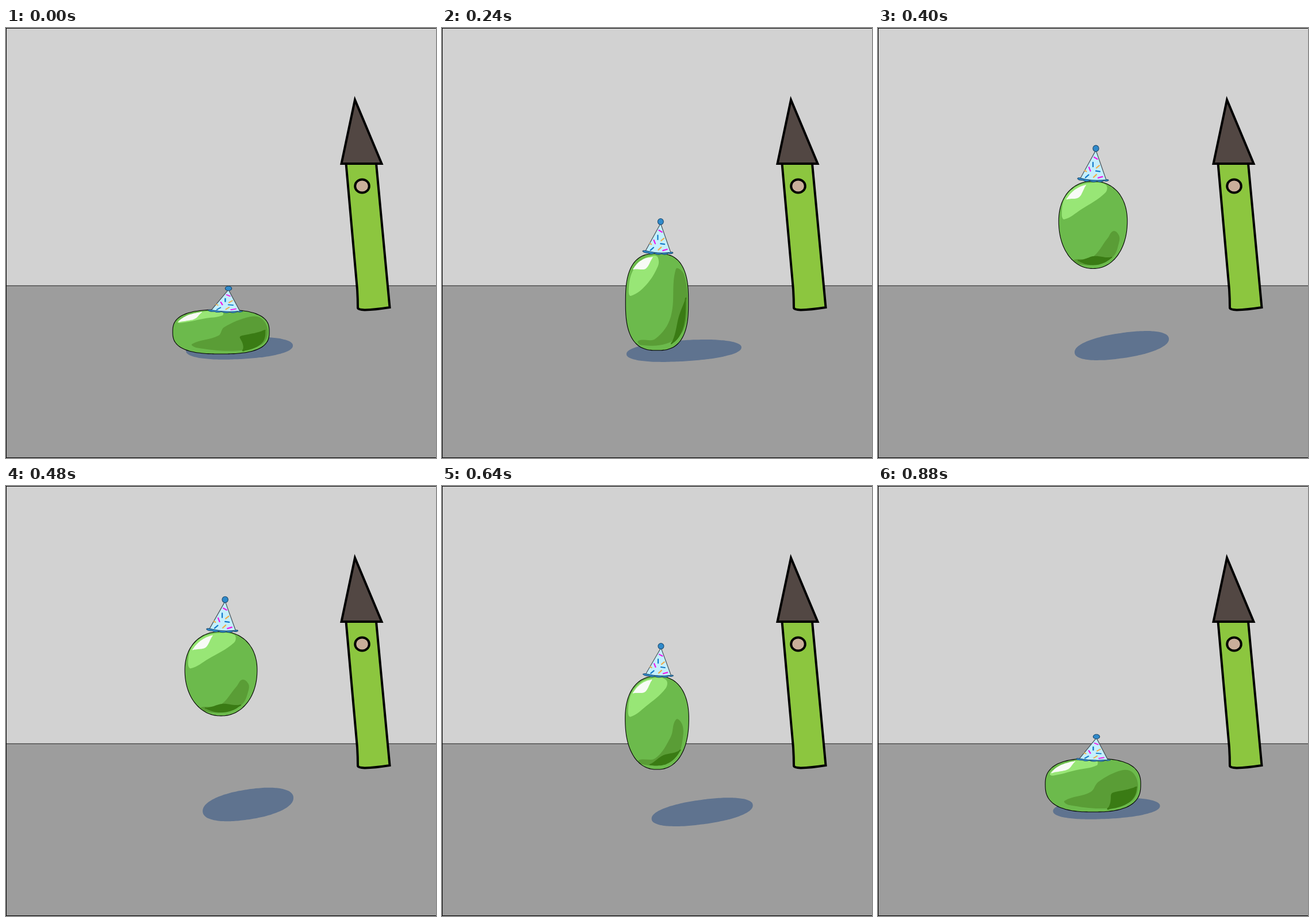
An HTML page with a canvas that plays this animation: 748 px wide and 748 px high, repeating every 960 ms.

```html
<!DOCTYPE html>
<html lang="en">
<head>
<meta charset="utf-8">
<title>Party jelly bounce</title>
<style>
html, body { margin: 0; width: 100%; height: 100%; overflow: hidden; }
canvas { display: block; }
</style>
</head>
<body>
<canvas id="stage" width="748" height="748"></canvas>
<script>
const ctx = document.getElementById('stage').getContext('2d');
const STEP = 80, STEPS = 12;
const FLOOR = 567, CENTER = 374;

// Key poses: body size, lift off the floor, roll of the shading,
// hat (x, rise above the body) and shadow (centre, radii)
const keys = [
  { at: 0, w: 168, h: 77, lift: 0, roll: 0, hatX: 387, rise: 37, sx: 406, sy: 557, rx: 93, ry: 19 },
  { at: 2, w: 130, h: 120, lift: 0, roll: 0.05, hatX: 383.5, rise: 50.5, sx: 410, sy: 564, rx: 87, ry: 22 },
  { at: 4, w: 96, h: 206, lift: 33, roll: 0, hatX: 377.5, rise: 59, sx: 431, sy: 557, rx: 110, ry: 15 },
  { at: 5, w: 119, h: 152, lift: 148.5, roll: 1, hatX: 379, rise: 57, sx: 424, sy: 552.5, rx: 82, ry: 22 },
  { at: 7, w: 125, h: 152, lift: 148, roll: 1, hatX: 382.5, rise: 54, sx: 425, sy: 558, rx: 82, ry: 27.5 },
  { at: 9, w: 103, h: 164, lift: 0, roll: 0.45, hatX: 379, rise: 49, sx: 471, sy: 574, rx: 94, ry: 15 },
  { at: 11, w: 166, h: 93, lift: 0, roll: 0.15, hatX: 380, rise: 38, sx: 397.5, sy: 561, rx: 93, ry: 18 }
];

const clamp = (v, lo, hi) => Math.min(hi, Math.max(lo, v));

// Key by index, wrapping around the loop with its time shifted to match
function keyAt(i) {
  const n = keys.length, turn = Math.floor(i / n), key = keys[i - turn * n];
  return { ...key, at: key.at + turn * STEPS };
}

// Smooth cubic motion through the keys
function poseAt(step) {
  const i = keys.findLastIndex(k => k.at <= step);
  const [p, a, b, q] = [-1, 0, 1, 2].map(d => keyAt(i + d));
  const span = b.at - a.at, t = (step - a.at) / span, s = 1 - t;
  const pose = {};
  for (const name in a) {
    const m0 = (b[name] - p[name]) / (b.at - p.at) * span;
    const m1 = (q[name] - a[name]) / (q.at - a.at) * span;
    pose[name] = a[name] * s * s * (1 + 2 * t) + b[name] * t * t * (3 - 2 * t) + m0 * t * s * s - m1 * t * t * s;
  }
  pose.lift = Math.max(0, pose.lift);
  pose.roll = clamp(pose.roll, 0, 1);
  return pose;
}

// Point on the unit superellipse in the direction of an angle
function rim(angle, n, scale = 1) {
  const c = Math.cos(angle), s = Math.sin(angle);
  const r = scale * (Math.abs(c) ** n + Math.abs(s) ** n) ** (-1 / n);
  return [r * c, r * s];
}

const range = (n, fn) => Array.from({ length: n }, (_, i) => fn(i / n));
const oval = n => range(96, t => rim(t * Math.PI * 2, n));

// Crescent hugging the rim, thickest in the middle
function crescent(middle, half, outer, thick, n) {
  return range(32, t => {
    const inner = t >= 0.5;
    const along = inner ? 2 - 2 * t : 2 * t;
    const depth = inner ? thick * Math.sin(along * Math.PI) : 0;
    return rim(middle + (along * 2 - 1) * half, n, outer - depth);
  });
}

// Closed smooth curve; handles follow each segment to avoid overshoot
function blob(points) {
  const n = points.length, at = i => points[(i + n) % n];
  const tangent = i => {
    const [x0, y0] = at(i - 1), [x1, y1] = at(i + 1);
    const d = Math.hypot(x1 - x0, y1 - y0) || 1;
    return [(x1 - x0) / d, (y1 - y0) / d];
  };
  const path = new Path2D();
  path.moveTo(...at(0));
  for (let i = 0; i < n; i++) {
    const [x0, y0] = at(i), [x1, y1] = at(i + 1);
    const [u0, v0] = tangent(i), [u1, v1] = tangent(i + 1);
    const h = Math.hypot(x1 - x0, y1 - y0) * 0.35;
    path.bezierCurveTo(x0 + u0 * h, y0 + v0 * h, x1 - u1 * h, y1 - v1 * h, x1, y1);
  }
  path.closePath();
  return path;
}

function paint(path, fill, stroke, width) {
  if (fill) { ctx.fillStyle = fill; ctx.fill(path); }
  if (stroke) { ctx.strokeStyle = stroke; ctx.lineWidth = width; ctx.stroke(path); }
}

function rect(color, x, y, w, h) {
  ctx.fillStyle = color;
  ctx.fillRect(x, y, w, h);
}

function drawRoom() {
  rect('#d2d2d2', 0, 0, 748, 448);
  rect('#9d9d9d', 0, 448, 748, 300);
  rect('#222', 0, 447.8, 748, 1);
  rect('#000', 0, 0, 748, 1);
  rect('#000', 0, 747, 748, 1);
  rect('#000', 0, 0, 1, 748);
}

const wall = new Path2D('M591.5 236L611 455Q612 472 612 487Q613 490 624 490.5Q642 490 667.5 486L644 236Z');
const roof = new Path2D('M607 125L583.5 236H653.5Z');
const porthole = new Path2D();
porthole.ellipse(619.5, 275, 12.3, 11.5, 0, 0, Math.PI * 2);

function drawTower() {
  paint(wall, '#8cc63f', '#000', 4);
  paint(roof, '#524743', '#000', 4);
  paint(porthole, '#c9ae9a', '#000', 4);
}

const cone = new Path2D('M0 3L-27 49.5Q-5 55 18 52Z');
const brim = new Path2D('M-32 49.5Q-30 47.5 -26 49Q-4 54.5 17 51.5Q22 50.5 22 52.5Q18 55 14 53Q8 57 2 54Q-5 57 -11 53Q-17 56 -22 52.5Q-30 53 -32 49.5Z');
const ball = new Path2D();
ball.arc(0, 0, 5.1, 0, Math.PI * 2);
const sprinkles = {
  '#f018e8': 'M-3 14.5L2.5 17.5M-12 31L-9.5 37M4 48.5L11.5 46.5',
  '#1479c8': 'M-5 23V30M0 37L7 38M-18 48L-12.5 43.5',
  '#f0ae4c': 'M1 32L6 28M-19 36.5L-16.5 38M-4 47.5L1 43'
};

function drawHat({ hatX, rise, w, h, lift }) {
  ctx.save();
  ctx.translate(hatX, FLOOR - lift - h - rise);
  ctx.scale(0.73 + 0.0023 * w, 0.23 + 0.0145 * rise);
  paint(cone, '#c4effd', '#465058', 1.2);
  ctx.lineCap = 'round';
  for (const color in sprinkles) paint(new Path2D(sprinkles[color]), null, color, 2.2);
  paint(brim, '#2f8acb', '#1f4a6c', 1);
  paint(ball, '#2f8acb', '#1f4a6c', 1.1);
  ctx.restore();
}

function drawShadow({ sx, sy, rx, ry, lift }) {
  const tilt = 4.5 + 7 * Math.min(1, lift / 33);
  paint(blob(oval(2.2).map(([u, v]) => [sx + u * rx, sy + v * ry - u * tilt])), '#5f738f');
}

// Shading is laid out in body units (-1 to 1); a rounder body is more egg shaped
function drawBody({ w, h, lift, roll }) {
  const n = 2.7 - 0.55 * roll;
  const aspect = h / w;
  const slim = clamp(aspect - 0.5, 0, 0.42);
  const place = points => blob(points.map(([u, v]) =>
    [CENTER + u * w / 2 * (1 - 0.06 * roll * v), FLOOR - lift + (v - 1) * h / 2]));

  const reach = 0.03 + 0.32 * roll;
  const light = [
    [-0.9, -0.45 + 0.5 * slim], [-0.8, -0.6], [-0.5, -0.86], [-0.1, -0.96],
    [reach, -0.92], [reach, -0.74], [-0.35, -0.6 + 0.6 * slim], [-0.83, -0.4 + 0.65 * slim]
  ];
  const top = -0.68 + 0.82 * roll;
  const shade = [
    [-0.6, 0.55 + 0.6 * slim], [-0.05, 0.17 + 1.4 * slim], [0.06 + 0.9 * slim, -0.2 + 1.2 * slim],
    [0.6, top], [0.85 - 0.08 * roll, top + 0.1], [0.97 - 0.19 * roll, 0.05 + 0.35 * roll],
    [0.82 - 0.2 * roll, 0.6 + 0.12 * roll], [0.3 - 0.15 * roll, 0.86 + 0.05 * roll], [-0.5, 0.72 + 0.4 * slim]
  ];

  const body = place(oval(n));
  paint(body, '#6cba4c');
  ctx.save();
  ctx.clip(body);
  paint(place(light), '#98e676');
  paint(place(crescent(0.25 * aspect - 2.45, 0.35, 0.93, 0.2, n)), '#f8fbf6');
  paint(place(shade), '#5a9d36');
  paint(place(crescent(0.5 + roll, 0.6, 0.92, 0.5 - 0.7 * slim, n)), '#3a7b14');
  ctx.restore();
  paint(body, null, '#000', 1.1);
}

function frame() {
  const pose = poseAt(Math.floor(performance.now() / STEP) % STEPS);
  drawRoom();
  drawTower();
  drawShadow(pose);
  drawBody(pose);
  drawHat(pose);
  requestAnimationFrame(frame);
}
frame();
</script>
</body>
</html>
```
